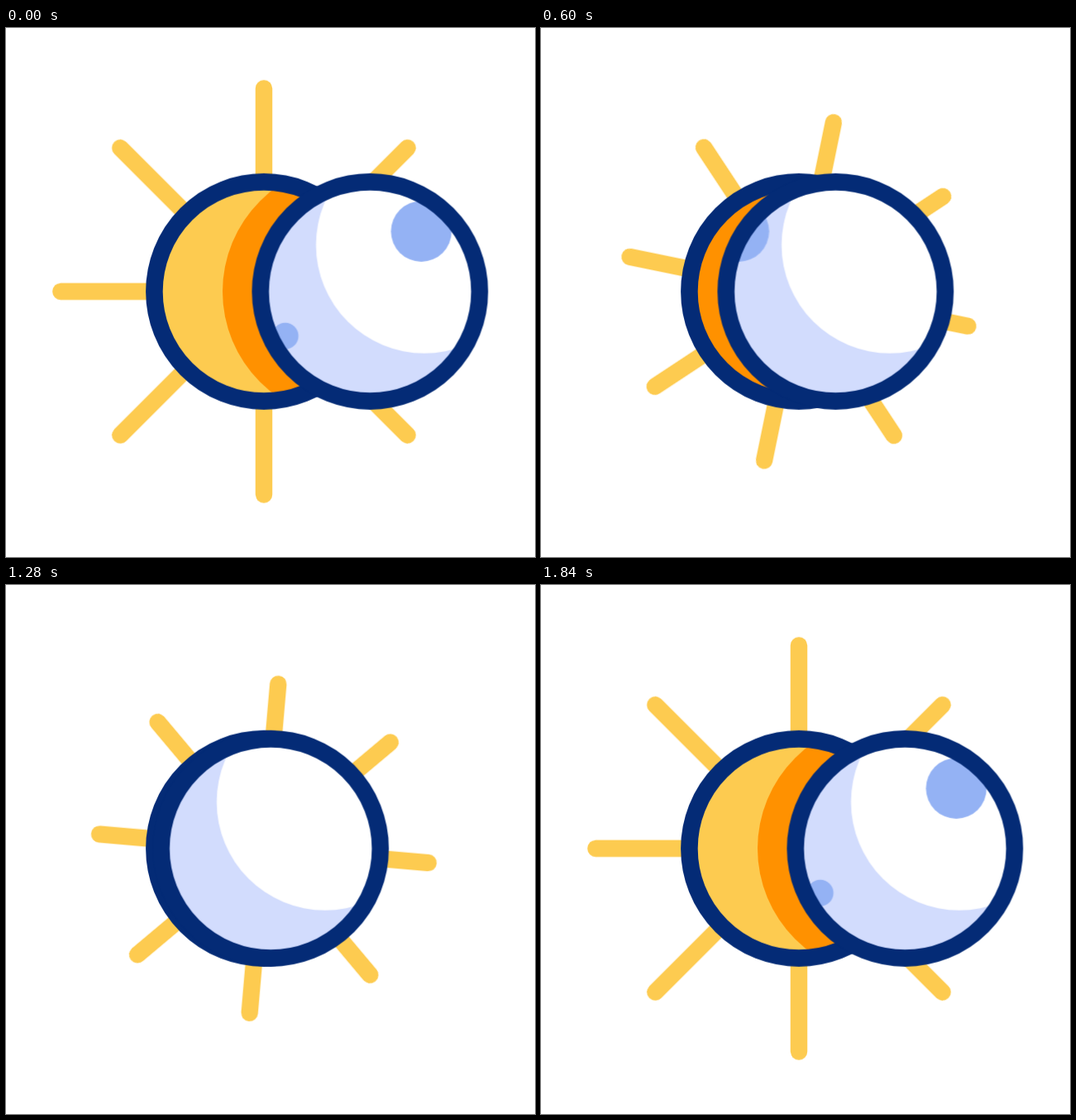
These frames come from a looping animation (640x640 px, 2 s). An HTML page:

```html
<!DOCTYPE html>
<html lang="en">
<head>
<meta charset="utf-8">
<title>Eclipse</title>
<style>
  html, body { margin: 0; width: 100%; height: 100%; overflow: hidden; background: #fff; }
  svg { display: block; width: 100vw; height: 100vh; }

  .spin, .ray, .slide, .craters { animation: 2s linear infinite; }
  .spin { animation-name: spin; }
  .ray { animation-name: shrink; stroke: #fdcb50; stroke-width: 20.4; stroke-linecap: round; }
  .slide { animation-name: slide; }
  .craters { animation-name: drift; fill: #94b2f4; }
  .rim { fill: none; stroke: #042b76; stroke-width: 20.6; }

  @keyframes spin {
    0%, 3.6% { transform: rotate(0deg); animation-timing-function: cubic-bezier(.719, 0, .403, 1); }
    89.25%, 100% { transform: rotate(-360deg); }
  }
  @keyframes shrink {
    0%, 16.75% { transform: translateX(0); animation-timing-function: cubic-bezier(.333, 0, .667, 1); }
    41.5% { transform: translateX(-66.4px); }
    52.5% { transform: translateX(-66.4px); animation-timing-function: cubic-bezier(.36, 0, .55, 1); }
    85.5%, 100% { transform: translateX(0); }
  }
  @keyframes slide {
    0%, 14.2% { transform: translateX(0); animation-timing-function: cubic-bezier(.333, 0, .667, 1); }
    40.55% { transform: translateX(-129.2px); }
    57.45% { transform: translateX(-129.2px); animation-timing-function: cubic-bezier(.576, 0, .245, 1); }
    87.85%, 100% { transform: translateX(0); }
  }
  /* The craters leave on the left and come back from the right. */
  @keyframes drift {
    0%, 13% { transform: translateX(0); animation-timing-function: cubic-bezier(.333, 0, .667, 1); }
    40.1% { transform: translateX(-260px); animation-timing-function: step-end; }
    56.05% { transform: translateX(260px); animation-timing-function: cubic-bezier(.576, 0, .245, 1); }
    86.45%, 100% { transform: translateX(0); }
  }
</style>
</head>
<body>
<svg viewBox="0 0 640 640">
  <defs>
    <clipPath id="disc"><circle r="130"/></clipPath>
  </defs>

  <g transform="translate(312 318.8)">
    <g class="spin">
      <g><line class="ray" x1="100" x2="245.7"/></g>
      <g transform="rotate(45)"><line class="ray" x1="100" x2="245.7"/></g>
      <g transform="rotate(90)"><line class="ray" x1="100" x2="245.7"/></g>
      <g transform="rotate(135)"><line class="ray" x1="100" x2="245.7"/></g>
      <g transform="rotate(180)"><line class="ray" x1="100" x2="245.7"/></g>
      <g transform="rotate(225)"><line class="ray" x1="100" x2="245.7"/></g>
      <g transform="rotate(270)"><line class="ray" x1="100" x2="245.7"/></g>
      <g transform="rotate(315)"><line class="ray" x1="100" x2="245.7"/></g>
    </g>
    <circle r="130" fill="#fdcb50"/>
    <g clip-path="url(#disc)">
      <circle class="slide" cx="105" r="155" fill="#ff9100"/>
    </g>
    <circle class="rim" r="132.6"/>
  </g>

  <g class="slide">
    <g transform="translate(440.4 318.8)">
      <circle r="130" fill="#d2dcfd"/>
      <g clip-path="url(#disc)">
        <circle cx="65.6" cy="-56.3" r="131" fill="#fff"/>
        <g class="craters">
          <circle cx="62" cy="-72.8" r="36.7"/>
          <circle cx="-102.6" cy="53.7" r="16"/>
        </g>
      </g>
      <circle class="rim" r="132.6"/>
    </g>
  </g>
</svg>
</body>
</html>
```
